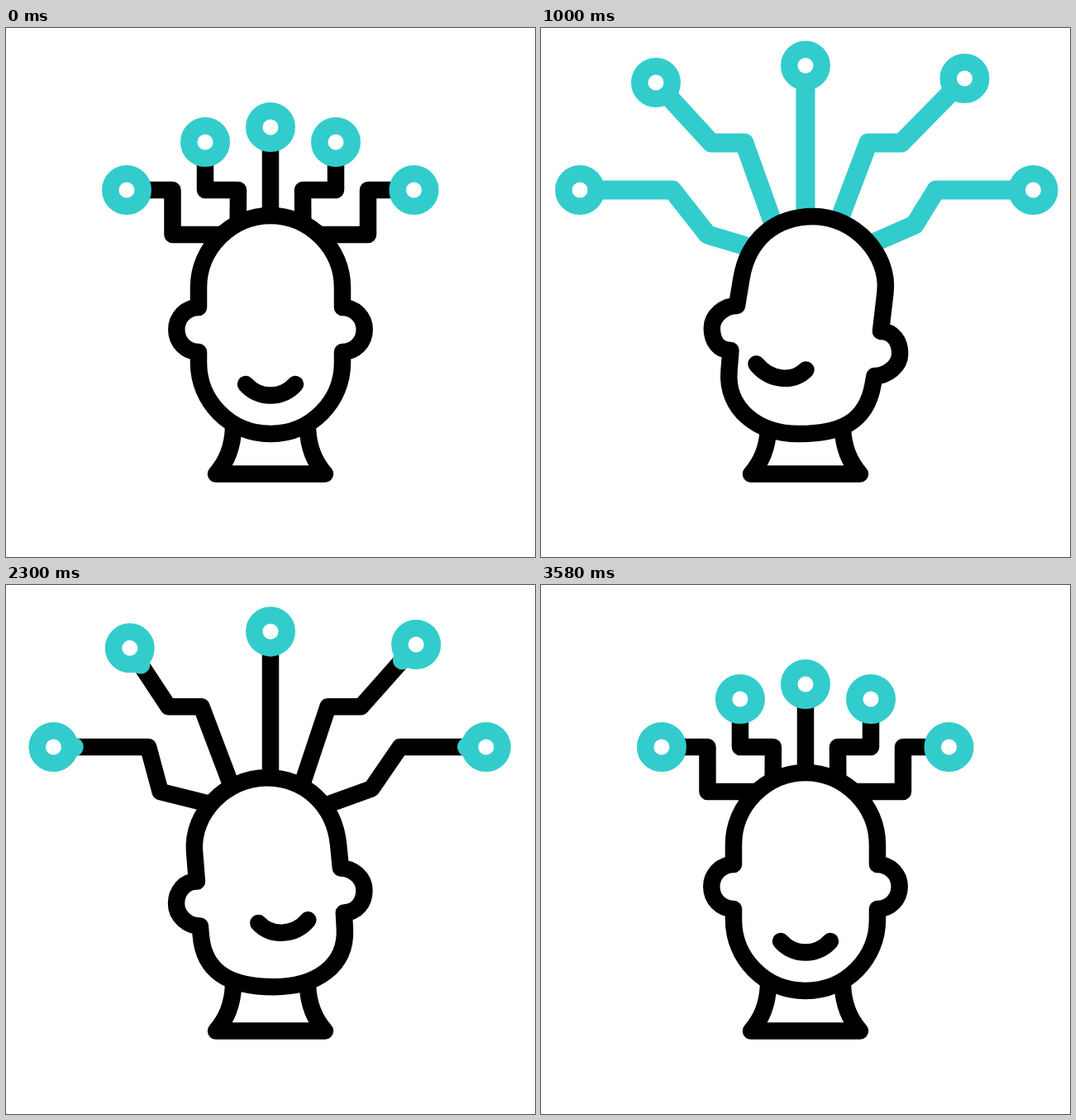
These frames come from a looping animation (640 by 640 pixels, 3.6 s). An HTML page with a canvas:

```html
<!DOCTYPE html>
<html lang="en">
<head>
<meta charset="utf-8">
<style>
html, body { margin: 0; width: 100%; height: 100%; overflow: hidden; background: #fff; }
canvas { display: block; }
</style>
</head>
<body>
<canvas id="stage" width="640" height="640"></canvas>
<script>
const ctx = document.getElementById('stage').getContext('2d');
const TEAL = '#33cccc', BLACK = '#000', WHITE = '#fff';
const LOOP = 3600, BEAT = 997, MOVE = 598, RETRACT = 385;
const LINE = 20.5, GLOW = 23;
const KNEE_LEFT = 201.5, KNEE_RIGHT = 438;

// [turn, lift, left spread, right spread, elbow x of the four bent wires, knee x of the outer two]
const poses = [
  [0, 0, 0, 0, [201.5, 241, 399, 438], [KNEE_LEFT, KNEE_RIGHT]],
  [1, 0, 1, 1, [159, 206, 436, 478], [KNEE_LEFT, 452]],
  [0, 1, 0.78, 0.7, [201.5, 211, 430, 456], [KNEE_LEFT, 446]],
  [-1, 0, 1, 1, [145, 183, 429, 496], [173, 439]]
];

const clamp = v => Math.max(0, Math.min(1, v));
const ease = v => (v = clamp(v), v * v * (3 - 2 * v));
const mix = (a, b, k) => Array.isArray(a) ? a.map((v, i) => mix(v, b[i], k)) : a + (b - a) * k;
const distance = (a, b) => Math.hypot(b[0] - a[0], b[1] - a[1]);

// The point that lies `length` past b on the line from a to b.
const extend = (a, b, length) => mix(a, b, 1 + length / distance(a, b));

function stroke(path, color, width = LINE) {
  ctx.strokeStyle = color;
  ctx.lineWidth = width;
  ctx.stroke(path);
}

function wires([turn, lift, left, right, elbows, knees]) {
  const outer = side => {
    const i = side < 0 ? 0 : 1, open = i ? right : left;
    const pull = knees[i] - (i ? KNEE_RIGHT : KNEE_LEFT);
    return [
      [i ? 493.5 + 102 * open : 146 - 99 * open, 196],
      [elbows[i * 3], 196],
      [knees[i], 250 - 0.85 * Math.max(0, pull)],
      [320 + side * (58 + 17 * open), 250 + 13 * open + 7 * lift]
    ];
  };
  const inner = side => {
    const i = side < 0 ? 0 : 1, x = elbows[i + 1], y = 196 - 57 * right;
    const slide = i ? 0 : 0.67 * Math.min(0, knees[0] - KNEE_LEFT);
    return [
      [i ? 399 + 113.5 * right : 241 - 102 * left, 138 - (i ? 77 : 72) * right],
      [x, y],
      [x - side * 40, y],
      [320 + side * 39.3 + slide, 236 + 4 * lift]
    ];
  };
  const middle = [[320, 120 - 74.5 * right], [320, 227 + 12 * lift]];
  return [outer(-1), inner(-1), middle, inner(1), outer(1)];
}

function drawWire(pts, charge) {
  const path = new Path2D();
  pts.forEach(p => path.lineTo(...p));
  stroke(path, BLACK);
  if (charge > 0) {
    const length = pts.slice(1).reduce((sum, p, i) => sum + distance(pts[i], p), 0);
    ctx.setLineDash(charge < 1 ? [length * charge, 2000] : []);
    stroke(path, TEAL, GLOW);
    ctx.setLineDash([]);
  }
  const ring = new Path2D();
  ring.arc(...pts[0], 19.75, 0, Math.PI * 2);
  ctx.fillStyle = WHITE;
  ctx.fill(ring);
  stroke(ring, TEAL);
}

// Each side runs from the crown round the ear to the chin; turning leans the head and drops one ear.
function drawHead(turn, lift) {
  const path = new Path2D(), tilt = Math.abs(turn);
  const top = [320 + 10 * turn, 227 + tilt + 12 * lift];
  const bottom = [320 - 8 * turn, 491 - 10 * lift];
  for (const side of [-1, 1]) {
    const at = (out, lean, y) => [320 + side * out + lean * turn, y + 11.5 * lift];
    const drop = 13.5 * tilt + 15.5 * turn * side, shift = 8.5 * turn * side;
    const crown = at(87, 9.5, 314 - 2.5 * tilt + shift);
    const earTop = at(87, 4, 338 + drop);
    const earTip = at(113.7, 0.5, 365 + drop);
    const earEnd = at(87, -3.5, 392 + drop);
    const cheek = at(87, -5.5, 405 + 18.5 * tilt + shift);
    const near = ([x, y], dx, dy) => [x + side * dx, y + dy];
    const curve = (...pts) => path.bezierCurveTo(...pts.flat());

    path.moveTo(...top);
    curve(near(top, 48, 0), extend(earTop, crown, 47), crown);
    path.lineTo(...earTop);
    curve(near(earTop, 15, 0), near(earTip, 0, -15), earTip);
    curve(near(earTip, 0, 15), near(earEnd, 15, 0), earEnd);
    path.lineTo(...cheek);
    curve(extend(earEnd, cheek, 46), near(bottom, 50, 0), bottom);
  }
  ctx.fillStyle = WHITE;
  ctx.fill(path);
  stroke(path, BLACK);
}

function drawSmile(turn, lift) {
  const path = new Path2D();
  const at = (dx, y) => [320 + dx - 29.5 * turn, y - 21 * Math.abs(turn) - 27 * lift + dx * turn * 0.117];
  path.moveTo(...at(-30, 431));
  path.bezierCurveTo(...at(-14, 449), ...at(14, 449), ...at(30, 431));
  stroke(path, BLACK);
}

const neck = new Path2D('M275 485C274 508 267 525 254 539.5H386C373 525 366 508 365 485');

function draw(t) {
  const beat = Math.floor(t / BEAT), local = t - beat * BEAT;
  const pose = mix(poses[beat], poses[(beat + 1) % 4], ease(local / MOVE));
  const [turn, lift] = pose;
  // Wires charge while the head rests and discharge as it moves on.
  const grow = beat < 3 ? ease((local - MOVE) / (BEAT - MOVE)) : 0;
  const fade = beat > 0 ? 1 - ease(local / RETRACT) : 0;

  ctx.fillStyle = WHITE;
  ctx.fillRect(0, 0, 640, 640);
  ctx.lineCap = ctx.lineJoin = 'round';
  for (const wire of wires(pose)) drawWire(wire, Math.max(grow, fade));
  stroke(neck, BLACK);
  drawHead(turn, lift);
  drawSmile(turn, lift);
}

const begin = performance.now();
function tick() {
  draw((performance.now() - begin) % LOOP);
  requestAnimationFrame(tick);
}
tick();
</script>
</body>
</html>
```
